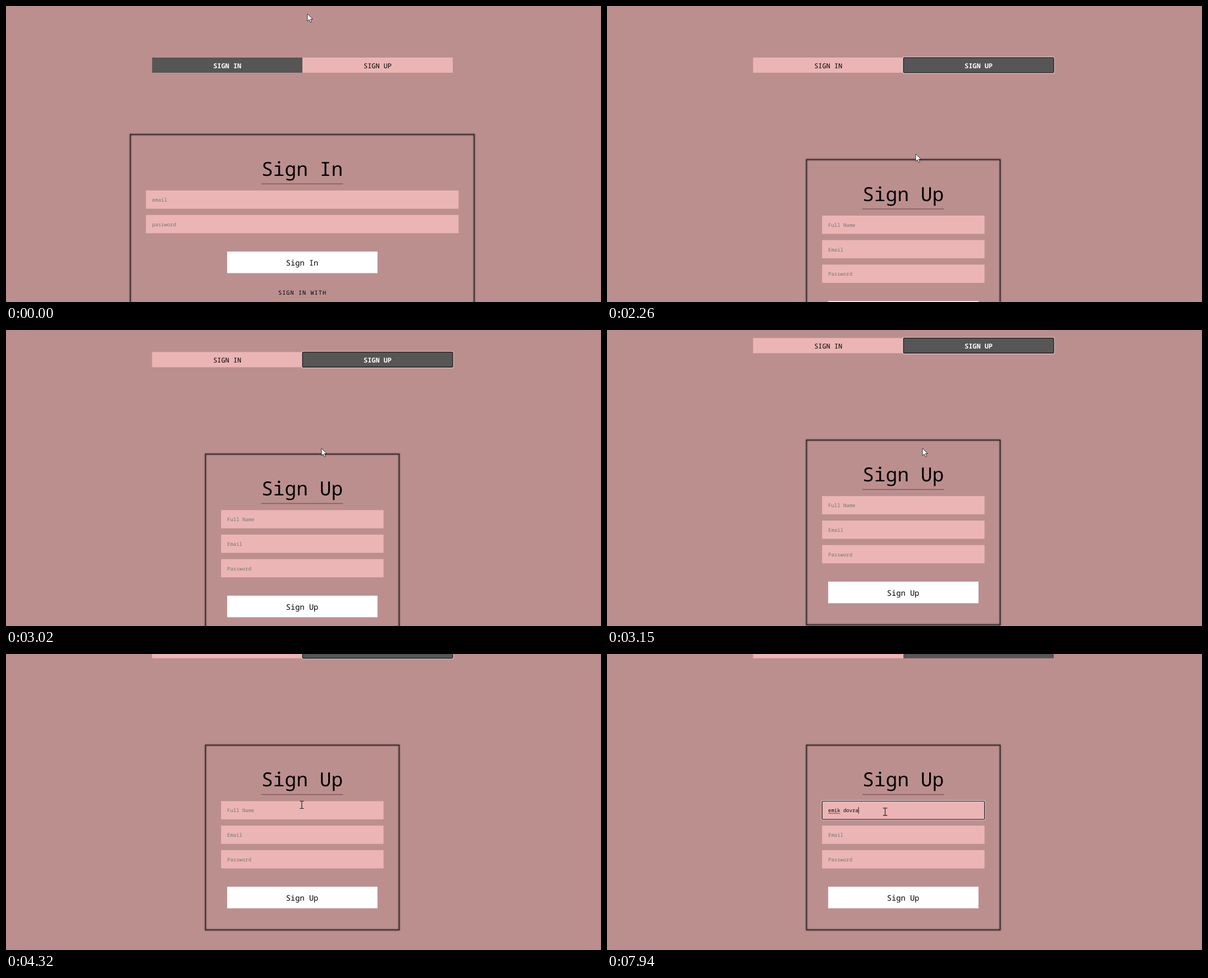
An HTML page for the animation above (8000 ms loop, 1060x528 px).

```html
<!DOCTYPE html>
<html lang="en">
<head>
<meta charset="utf-8">
<title>Sign in and sign up</title>
<style>
  html, body { margin: 0; width: 100%; height: 100%; overflow: hidden; background: #bc8f8f; }
  svg { display: block; width: 100vw; height: 100vh; }
  text { font-family: "Roboto Mono", "Noto Sans Mono", "DejaVu Sans Mono", monospace; white-space: pre; text-rendering: geometricPrecision; }
</style>
</head>
<body>
<svg id="stage" viewBox="0 0 1060 528" xmlns="http://www.w3.org/2000/svg"></svg>
<script>
const LOOP = 8000, STEP = 63;
const PINK = '#ebb5b5', DARK = '#555655', GREY = '#757575';
const CX = 527.6, TAB_W = 267.8, TAB_H = 27, FIELD_H = 32.5, FIELD_GAP = 43.7;
const SMALL = 8.95, CHAR = SMALL * .6;

const rect = (x, y, w, h, fill, extra = '') =>
  `<rect x="${x}" y="${y}" width="${w}" height="${h}" fill="${fill}" ${extra}/>`;
const text = (x, y, size, str, extra = '') =>
  `<text x="${x}" y="${y}" font-size="${size}" ${extra}>${str}</text>`;
const centred = (x, y, size, str, extra = '') =>
  text(x, y, size, str, 'text-anchor="middle" ' + extra);

const ring = (id, x, y, w, h) => `<g id="${id}">
  ${rect(x - 1, y - 1, w + 2, h + 2, 'none', 'rx="2" stroke="#fff" stroke-width=".8"')}
  ${rect(x, y, w, h, 'none', 'rx="1.5" stroke="#101010" stroke-width="1.2"')}</g>`;

const tab = (x, label, active) =>
  rect(x, 92, TAB_W, TAB_H, active ? DARK : PINK) +
  centred(x + TAB_W / 2, 110.6, 11.9, label, active ? 'fill="#fff" font-weight="600"' : '');
const tabs = second =>
  tab(260.3, 'SIGN IN', !second) + tab(260.3 + TAB_W, 'SIGN UP', second);

function card(x, y, w, h, title, labels) {
  const frame = (width, extra) =>
    rect(x, y, w, h, 'none', `stroke="#000" stroke-width="${width}" ${extra}`);
  const top = y + 99.9, end = top + FIELD_GAP * labels.length + 21.5;
  const fields = labels.map((label, i) => {
    const fy = top + FIELD_GAP * i;
    return rect(x + 27.8, fy, w - 55.6, FIELD_H, PINK) +
      text(x + 38.7, fy + 20, SMALL, label, `fill="${GREY}" class="hint"`);
  });
  return frame(2.4, 'filter="url(#glow)" stroke-opacity=".6"') + frame(1, 'stroke-opacity=".7"') +
    centred(CX, y + 73.8, 34.6, title) +
    rect(455, y + 87.3, 145.5, 1.6, '#8b5a5c') +
    fields.join('') +
    rect(394, end, TAB_W, 38.5, '#fff') + centred(CX, end + 24.8, 13.7, title);
}

const stage = document.getElementById('stage');
stage.innerHTML = `
<defs><filter id="glow" x="-5%" y="-5%" width="110%" height="110%"><feGaussianBlur stdDeviation="1.2"/></filter></defs>
${rect(0, 0, 1060, 528, '#bc8f8f')}
<g id="page">
  <g id="signIn">
    ${tabs(false)}
    ${card(221.5, 229.2, 612.6, 420, 'Sign In', ['email', 'password'])}
    ${centred(CX + .5, 514.6, 10.3, 'SIGN IN WITH', 'letter-spacing="1"')}
  </g>
  <g id="signUp">
    ${tabs(true)}
    ${card(355.4, 274, 345, 329.5, 'Sign Up', ['Full Name', 'Email', 'Password'])}
    ${ring('tabRing', 260.3 + TAB_W, 92, TAB_W, TAB_H)}
    ${ring('fieldRing', 383.2, 373.9, 289.4, FIELD_H)}
    ${text(394.1, 393.9, SMALL, '', 'id="typed"')}
    ${rect(394, 395.2, CHAR * 4, 1.1, '#f02020', 'id="spell"')}
    ${rect(394, 384.5, .9, 11.5, '#000', 'id="caret"')}
  </g>
</g>
<path id="arrow" d="M0 0V13.2L3.1 10.3L5.2 15.2L7.4 14.2L5.3 9.5H9.5Z" fill="#fff" stroke="#111" stroke-width=".8" stroke-linejoin="round"/>
<path id="beam" d="M-3.8-6.5H-.8L0-6L.8-6.5H3.8M0-6V6M-3.8 6.5H-.8L0 6L.8 6.5H3.8" fill="none" stroke="#1c2526" stroke-width="1.2"/>`;

const el = {};
stage.querySelectorAll('[id]').forEach(e => el[e.id] = e);
const nameHint = el.signUp.querySelector('.hint');
const show = (e, on) => e.setAttribute('visibility', on ? 'inherit' : 'hidden');

const NAME = 'emik dovra';
const CLICK_TAB = 1540, TO_BEAM = 3500, CLICK_FIELD = 5250;
const TYPE_FROM = 6050, TYPE_TO = 7940;

// Straight pointer legs: first change, last change, end x, end y
const LEGS = [
  [380, 620, 524, 42], [680, 1020, 573, 86], [1160, 1400, 603, 107],
  [2020, 2260, 550, 264], [2510, 2690, 562, 211], [3680, 3820, 563, 205],
  [4000, 4320, 527, 269], [4380, 4760, 499, 280], [4810, 5000, 495.5, 281.3]
];

// Share of a move done at time t, advancing once per STEP
function progress(t, from, to) {
  if (t < from) return 0;
  if (t >= to) return 1;
  const gaps = Math.round((to - from) / STEP);
  return (1 + Math.floor((t - from) / (to - from) * gaps)) / (gaps + 1);
}

function pointer(t) {
  let x = 537, y = 14;
  for (const [from, to, endX, endY] of LEGS) {
    const p = progress(t, from, to);
    x += (endX - x) * p;
    y += (endY - y) * p;
  }
  return [x, y];
}

// Two equal turns of the wheel, each eased
function scroll(t) {
  const p = 2 * progress(t, 2880, 3250), turn = Math.floor(p), k = p - turn;
  return 55.7 * (turn + k * k * (3 - 2 * k));
}

// Typing that slows down slightly towards the end
function typedCount(t) {
  if (t < TYPE_FROM) return 0;
  const p = Math.min(1, (t - TYPE_FROM) / (TYPE_TO - TYPE_FROM));
  return 1 + Math.floor((NAME.length - 1) * p ** (1 / 1.4));
}

function render(t) {
  const joined = t >= CLICK_TAB, focused = t >= CLICK_FIELD;
  show(el.signIn, !joined);
  show(el.signUp, joined);
  show(el.tabRing, joined && !focused);
  show(el.fieldRing, focused);
  el.page.setAttribute('transform', `translate(0 ${-scroll(t)})`);

  const count = typedCount(t);
  el.typed.textContent = NAME.slice(0, count);
  show(nameHint, !count);
  show(el.spell, count > 4);
  show(el.caret, count > 0 || (t >= 5320 && t < 5820));
  el.caret.setAttribute('x', 394 + count * CHAR);
  if (!joined) [el.spell, el.caret].forEach(e => show(e, false));

  const [x, y] = pointer(t), beam = t >= TO_BEAM;
  show(el.arrow, !beam);
  show(el.beam, beam);
  (beam ? el.beam : el.arrow).setAttribute('transform', `translate(${x} ${y})`);
}

const start = performance.now();
function tick() {
  render((performance.now() - start) % LOOP);
  requestAnimationFrame(tick);
}
tick();
</script>
</body>
</html>
```
